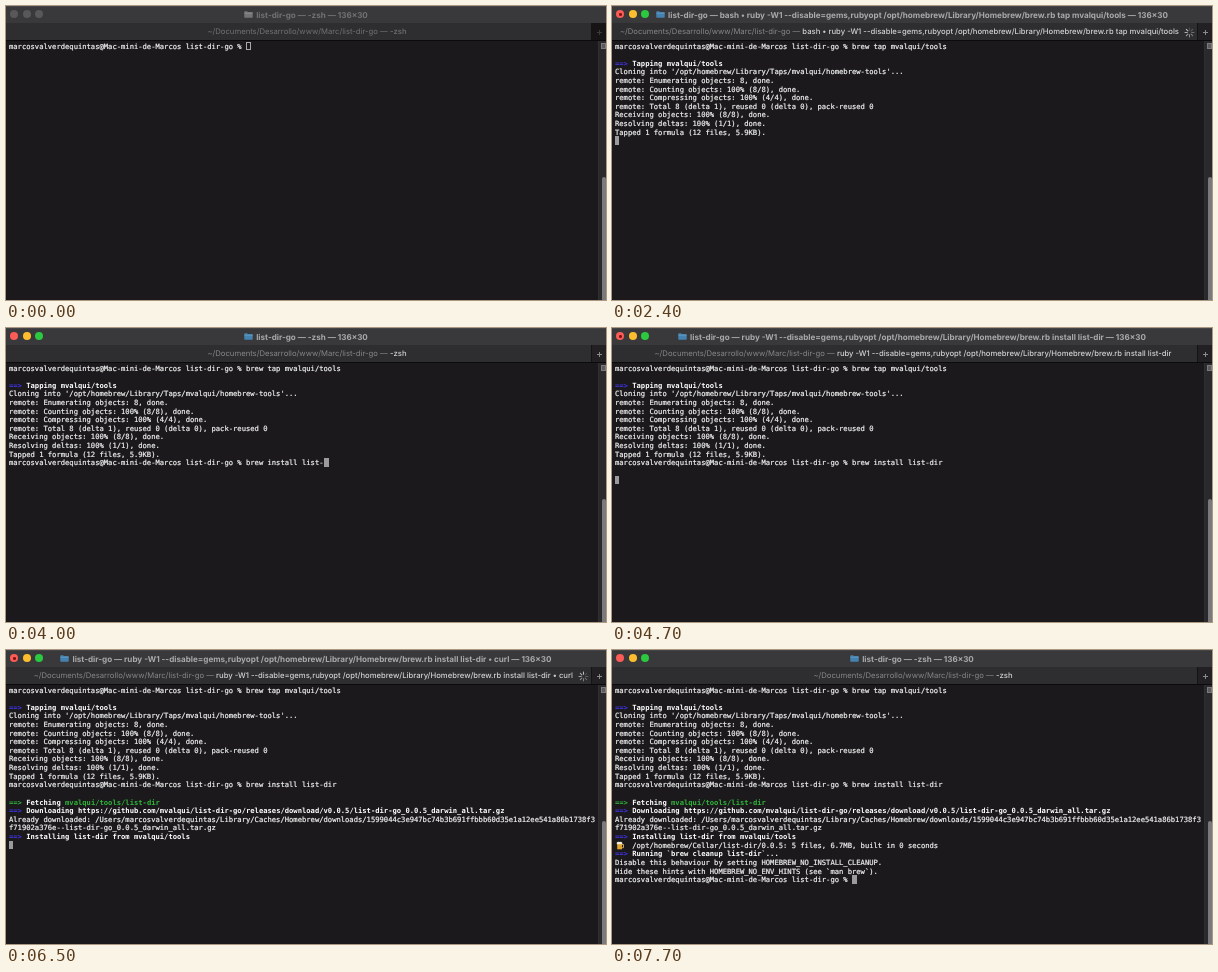
Write an HTML page that moves like this. It is 600 px wide and 294 px high and loops after 8 s.

```html
<!DOCTYPE html>
<html lang="en">
<head>
<meta charset="utf-8">
<title>Terminal session</title>
<style>
  html, body { margin: 0; width: 100%; height: 100%; overflow: hidden; background: #1b191c; }
  #win { position: relative; width: 600px; height: 294px; overflow: hidden; background: #1b191c; text-rendering: geometricPrecision; }
  #win * { position: absolute; white-space: pre; }
  #win span { position: static; }

  #bar { left: 0; top: 0; width: 600px; height: 17px; background: #39383a; box-shadow: inset 0 1px #454446; }
  #tabs { left: 0; top: 17px; width: 600px; height: 18px; background: #2e2d2f; border-bottom: 1px solid #0c0b0c; box-sizing: border-box; }
  #title, #tab { font: 7.7px/18px Inter, "Liberation Sans", sans-serif; }
  #title { top: 0; font-size: 8.1px; font-weight: 700; color: #aaa9ab; }
  #tab { top: 0; color: #878688; }
  #tab b { position: static; font-weight: 500; color: #d4d3d5; }
  #plus { left: 585px; top: 0; width: 15px; height: 17px; border-left: 1px solid #151415; background: #222022; box-sizing: border-box; color: #8b8a8c; }
  #plus::before, #plus::after { content: ""; position: absolute; background: currentColor; }
  #plus::before { left: 5px; top: 9px; width: 5px; height: 1px; }
  #plus::after { left: 7px; top: 7px; width: 1px; height: 5px; }
  .dot { top: 4.4px; width: 8px; height: 8px; border-radius: 50%; }
  .busy #close::after { content: ""; position: absolute; left: 2.8px; top: 2.8px; width: 2.4px; height: 2.4px; border-radius: 50%; background: #7a1512; }
  #folder { top: 4px; width: 9px; height: 9px; color: #4482b2; }

  .idle #title, .idle #tab, .idle #tab b { color: #727173; }
  .idle .dot { background: #58575a !important; }
  .idle #folder { color: #747375; }
  .idle #plus { background: #171416; color: #3d3a3c; }

  #text { left: 3px; top: 36.5px; font: 7.173px/8.62px "DejaVu Sans Mono", monospace; color: #f0f0f0; -webkit-text-stroke: .22px; }
  #text b { position: static; color: #fff; -webkit-text-stroke: 0; }
  #text .blue { color: #4034e6; }
  #text .green { color: #2fb53a; }
  #mug { left: 4px; top: 191px; width: 9px; height: 9px; }
  #cursor { width: 4.3px; height: 8.6px; background: #9b9a9c; box-sizing: border-box; }
  .idle #cursor { background: none; border: 1px solid #a9a8aa; }

  #track { left: 592px; top: 35px; width: 8px; height: 259px; background: #2a292b; border-left: 1px solid #2f2e30; box-sizing: border-box; }
  #thumb { left: 595.5px; top: 171px; width: 4.5px; height: 130px; border-radius: 2.2px; background: #7a797b; }
  #split { left: 595px; top: 37px; width: 5px; height: 6px; border: 1px solid #7b7a7c; background: #5b5a5c; box-sizing: border-box; }
</style>
</head>
<body>
<div id="win">
  <div id="bar">
    <div class="dot" id="close" style="left:4.4px;background:#fc5b57"></div>
    <div class="dot" style="left:16.9px;background:#fdbd2f"></div>
    <div class="dot" style="left:29.4px;background:#2bc840"></div>
    <svg id="folder" viewBox="0 0 10 9"><path fill="currentColor" d="M.3 1.6q0-.8.8-.8h2.3l1 1h4.5q.8 0 .8.8v4.8q0 .8-.8.8H1.1q-.8 0-.8-.8z"/><path d="M.3 3.1h9.400" stroke="#fff" stroke-opacity=".3" stroke-width=".6"/></svg>
    <div id="title"></div>
  </div>
  <div id="tabs">
    <div id="tab"></div>
    <svg id="spin" style="left:572px;top:3.5px" width="11" height="11" viewBox="-5.5 -5.5 11 11"></svg>
    <div id="plus"></div>
  </div>
  <div id="text"></div>
  <svg id="mug" viewBox="0 0 9 9"><path d="M5.8 3.5h1.7v3.2H5.8" fill="none" stroke="#c9a25a"/><path d="M1.2 2.5h4.8V8.3H1.2z" fill="#e0a52c"/><path d="M.8 1.6q1-1.4 2.5-.7 2-.8 3 .9v1.5H.8z" fill="#f4eee0"/></svg>
  <div id="cursor"></div>
  <div id="track"></div>
  <div id="split"></div>
  <div id="thumb"></div>
</div>
<script>
const LOOP = 8000, CELL = 4.318, ROW = 8.62, LEFT = 3, TOP = 35.6;
const USER = 'marcosvalverdequintas', TAP = 'mvalqui/tools';
const PROMPT = USER + '@Mac-mini-de-Marcos list-dir-go % ';
const PATH = '~/Documents/Desarrollo/www/Marc/list-dir-go — ';
const BREW = '/opt/homebrew/Library/Homebrew/brew';
const RUBY = `ruby -W1 --disable=gems,rubyopt ${BREW}.rb `;
const $ = id => document.getElementById(id);

const step = (color, text) => `<b class="${color}">==&gt;</b> <b>${text}</b>`;

// Each row: time of appearance, markup, and for prompts the typed command
const rows = [
  { at: 0, cmd: 'brew tap ' + TAP, from: 200, to: 700, enter: 1000 },
  { at: 1100, html: '' },
  { at: 1600, html: step('blue', 'Tapping ' + TAP) },
  { at: 1800, html: "Cloning into '/opt/homebrew/Library/Taps/mvalqui/homebrew-tools'..." },
  { at: 2100, html: 'remote: Enumerating objects: 8, done.' },
  { at: 2100, html: 'remote: Counting objects: 100% (8/8), done.' },
  { at: 2100, html: 'remote: Compressing objects: 100% (4/4), done.' },
  { at: 2200, html: 'remote: Total 8 (delta 1), reused 0 (delta 0), pack-reused 0' },
  { at: 2200, html: 'Receiving objects: 100% (8/8), done.' },
  { at: 2200, html: 'Resolving deltas: 100% (1/1), done.' },
  { at: 2400, html: 'Tapped 1 formula (12 files, 5.9KB).' },
  { at: 2800, cmd: 'brew install list-dir', from: 3500, to: 4100, enter: 4500 },
  { at: 4600, html: '' },
  { at: 5200, html: step('green', `Fetching <span class="green">${TAP}/list-dir</span>`) },
  { at: 5300, html: step('blue', 'Downloading https://github.com/mvalqui/list-dir-go/releases/download/v0.0.5/list-dir-go_0.0.5_darwin_all.tar.gz') },
  { at: 6000, html: `Already downloaded: /Users/${USER}/Library/Caches/Homebrew/downloads/1599044c3e947bc74b3b691ffbbb60d35e1a12ee541a86b1738f3` },
  { at: 6000, html: 'f71902a376e--list-dir-go_0.0.5_darwin_all.tar.gz' },
  { at: 6200, html: step('blue', 'Installing list-dir from ' + TAP) },
  { at: 7000, html: '    /opt/homebrew/Cellar/list-dir/0.0.5: 5 files, 6.7MB, built in 0 seconds', mug: true },
  { at: 7100, html: step('blue', 'Running `brew cleanup list-dir`...') },
  { at: 7200, html: 'Disable this behaviour by setting HOMEBREW_NO_INSTALL_CLEANUP.' },
  { at: 7200, html: 'Hide these hints with HOMEBREW_NO_ENV_HINTS (see `man brew`).' },
  { at: 7600, cmd: '', from: LOOP, to: LOOP + 1, enter: LOOP }
];

const jobs = [
  [0, '-zsh'],
  [1000, `bash -p ${BREW}.sh tap ${TAP}`],
  [1100, `xcode-select • bash -p ${BREW}.sh tap ${TAP}`],
  [1400, `${RUBY}tap ${TAP}`],
  [1700, `bash • ${RUBY}tap ${TAP}`],
  [2800, '-zsh'],
  [4500, `bash -p ${BREW}.sh install list-dir`],
  [4600, `${RUBY}install list-dir`],
  [5200, `${RUBY}install list-dir • curl`],
  [6800, `${RUBY}install list-dir`],
  [7700, '-zsh']
];

const within = (t, ...spans) => spans.some(([a, b]) => t >= a && t < b);

function typed(row, t) {
  const part = (t - row.from) / (row.to - row.from);
  return row.cmd.slice(0, Math.round(row.cmd.length * Math.min(1, Math.max(0, part))));
}

function drawText(t) {
  const seen = rows.filter(r => t >= r.at);
  const last = seen[seen.length - 1];
  const editing = last.cmd !== undefined && t < last.enter;
  $('text').innerHTML = seen.map((r, i) => {
    const html = r.cmd === undefined ? r.html : PROMPT + typed(r, t);
    return `<div style="top:${i * ROW}px">${html}</div>`;
  }).join('');
  const col = editing ? PROMPT.length + typed(last, t).length : 0;
  const line = seen.length - (editing ? 1 : 0);
  $('cursor').style.left = LEFT + col * CELL + 'px';
  $('cursor').style.top = TOP + line * ROW + 'px';
  $('mug').style.display = seen.some(r => r.mug) ? '' : 'none';
}

function drawHead(t) {
  const job = jobs.filter(j => t >= j[0]).pop()[1];
  $('win').classList.toggle('busy', job !== '-zsh');
  $('title').textContent = `list-dir-go — ${job} — 136×30`;
  $('tab').innerHTML = `${PATH}<b>${job}</b>`;
  const wide = $('title').getBoundingClientRect().width;
  const x = 300 - (wide + 12) / 2;
  $('folder').style.left = x + 'px';
  $('title').style.left = x + 12 + 'px';
  const tabWide = $('tab').getBoundingClientRect().width;
  $('tab').style.left = Math.min(301 - tabWide / 2, 567 - tabWide) + 'px';
}

function drawSpin(t) {
  const on = within(t, [1300, 2800], [5000, 7700]);
  const turn = Math.floor(t / 100);
  $('spin').innerHTML = on ? Array.from({ length: 8 }, (_, i) =>
    `<path d="M0-2.2V-4.5" stroke="#d0cfd1" stroke-linecap="round" stroke-opacity="${0.2 + 0.8 * ((i - turn + 800) % 8) / 8}" transform="rotate(${i * 45})"/>`
  ).join('') : '';
}

let shown = -1;
function paint() {
  const t = Math.floor(performance.now() % LOOP / 100) * 100;
  if (t !== shown) {
    shown = t;
    $('win').classList.toggle('idle', within(t, [0, 200], [3000, 3500]));
    drawText(t);
    drawHead(t);
    drawSpin(t);
  }
  requestAnimationFrame(paint);
}
paint();
</script>
</body>
</html>
```
